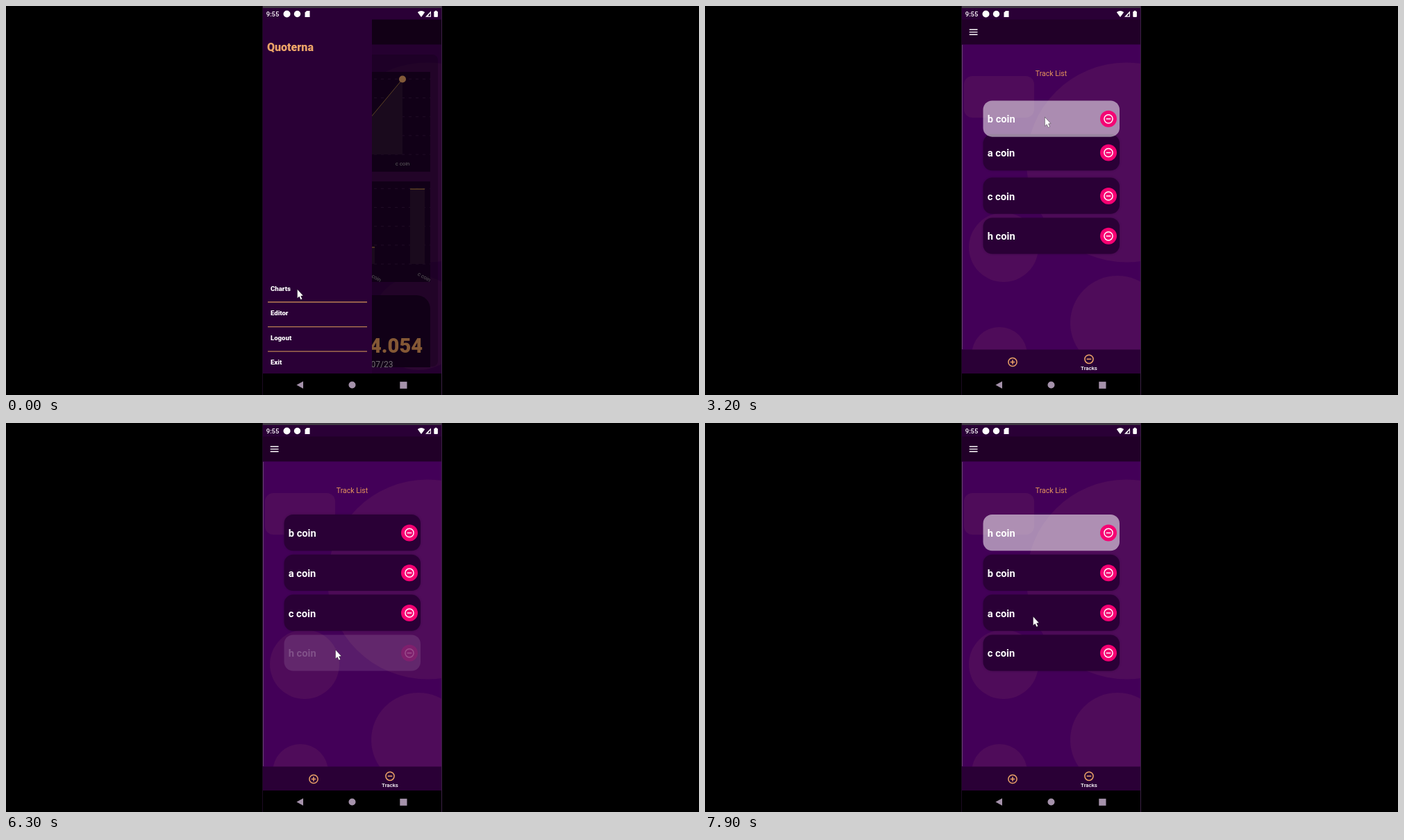
Write an HTML page with a canvas that moves like this. It is 998 px wide and 561 px high and loops after 8 s.

```html
<!DOCTYPE html>
<html lang="en">
<head>
<meta charset="utf-8">
<title>Track list</title>
<style>
  html, body { margin: 0; width: 100%; height: 100%; overflow: hidden; background: #000; }
  canvas { display: block; width: 998px; height: 561px; }
</style>
</head>
<body>
<canvas id="stage" width="998" height="561"></canvas>
<script>
const ctx = document.getElementById('stage').getContext('2d');
const LOOP = 8000, STEP = 100;
const LEFT = 370, WIDTH = 257.5, DRAWER = 157;
const FIRST_ROW = 132, PITCH = 57.8;
const DARK = '#2a0036', PURPLE = '#430058', BLOB = '#4f0c5a', ORANGE = '#eca468', PINK = '#f60073';

const NAMES = ['a coin', 'b coin', 'c coin', 'h coin'];
const DRAG_TIME = 650, SHIFT_TIME = 400, SHIFT_GAP = 150;

// Each drag lifts one card from its row to the top of the list.
const DRAGS = [
  { name: 'b coin', row: 1, press: 2000, lift: 2600, lead: 270, release: 4500 },
  { name: 'h coin', row: 3, press: 5700, lift: 6400, lead: 180, release: LOOP }
];

// Pointer moves: start, duration, destination.
const MOVES = [
  [0, 300, 414, 439], [400, 500, 512, 214], [900, 1000, 488, 223], [2600, 630, 489, 157],
  [3700, 600, 483, 262], [4700, 500, 479, 270], [5200, 400, 474, 327],
  [6400, 500, 473, 156], [7300, 600, 472, 279]
];

const progress = (t, start, duration) => Math.min(1, Math.max(0, (t - start) / duration));
const smooth = p => p * p * (3 - 2 * p);

function pointerAt(t) {
  let x = 419, y = 408.5;
  for (const [start, duration, toX, toY] of MOVES) {
    const p = progress(t, start, duration);
    x += (toX - x) * p;
    y += (toY - y) * p;
  }
  return [x, y];
}

function cardsAt(t) {
  const cards = NAMES.map((name, row) => ({ name, row, slot: row, alpha: 1, active: false }));
  for (const { name, row, press, lift, lead, release } of DRAGS) {
    for (const card of cards) {
      if (card.name === name) {
        card.row -= row * progress(t, lift, DRAG_TIME);
        card.slot = 0;
        card.alpha = 1 - .8 * progress(t, press, 250) + .8 * smooth(progress(t, lift + 200, 450));
        card.active = t >= lift - 100 && t < release;
      } else if (card.slot < row) {
        const delay = lead + SHIFT_GAP * (row - card.slot - 1);
        card.row += smooth(progress(t, lift + delay, SHIFT_TIME));
        card.slot++;
      }
    }
  }
  return cards.sort((a, b) => a.active - b.active);
}

function rect(x, y, w, h, color) {
  ctx.fillStyle = color;
  ctx.fillRect(x, y, w, h);
}

function round(x, y, w, h, r, color) {
  ctx.fillStyle = color;
  ctx.beginPath();
  ctx.roundRect(x, y, w, h, r);
  ctx.fill();
}

function disc(x, y, r, color) {
  ctx.fillStyle = color;
  ctx.beginPath();
  ctx.arc(x, y, r, 0, Math.PI * 2);
  ctx.fill();
}

function poly(points, color) {
  ctx.fillStyle = color;
  ctx.beginPath();
  points.forEach(([x, y]) => ctx.lineTo(x, y));
  ctx.closePath();
  ctx.fill();
}

function line(x1, y1, x2, y2, color, width = 1, dash = []) {
  ctx.strokeStyle = color;
  ctx.lineWidth = width;
  ctx.setLineDash(dash);
  ctx.beginPath();
  ctx.moveTo(x1, y1);
  ctx.lineTo(x2, y2);
  ctx.stroke();
  ctx.setLineDash([]);
}

function text(str, x, y, size, color, weight = 400, align = 'left') {
  ctx.font = `${weight} ${size}px Roboto, sans-serif`;
  ctx.textAlign = align;
  ctx.fillStyle = color;
  ctx.fillText(str, x, y);
}

function ringIcon(x, y, color, plus) {
  ctx.strokeStyle = color;
  ctx.lineWidth = 1.5;
  ctx.beginPath();
  ctx.arc(x, y, 6.1, 0, Math.PI * 2);
  ctx.stroke();
  line(x - 3.3, y, x + 3.3, y, color, 1.5);
  if (plus) line(x, y - 3.3, x, y + 3.3, color, 1.5);
}

function backdrop() {
  rect(LEFT, 19, WIDTH, 511, PURPLE);
  round(373, 101, 101, 60, 12, BLOB);
  disc(607, 225.5, 144, BLOB);
  disc(430, 348, 50, BLOB);
  disc(424, 503, 40, BLOB);
  disc(594, 457, 68, BLOB);
}

function header() {
  rect(LEFT, 19, WIDTH, 36.5, '#210028');
  for (let i = 0; i < 3; i++) line(380.7, 34 + i * 3.6, 392.5, 34 + i * 3.6, '#fff', 1.4);
}

function drawCard({ name, row, alpha, active }) {
  const y = FIRST_ROW + row * PITCH;
  ctx.save();
  ctx.globalAlpha = alpha;
  if (!active) {
    ctx.shadowColor = 'rgba(30,0,40,.35)';
    ctx.shadowBlur = 3;
  }
  round(400.5, y, 196.5, 52.2, 13, active ? 'rgba(255,255,255,.54)' : DARK);
  ctx.shadowColor = 'transparent';
  text(name, 406.7, y + 32, 14.7, '#fff', 700);
  disc(581, y + 26.4, 12, PINK);
  ringIcon(581, y + 26.4, '#fff');
  ctx.restore();
}

function trackPage(t) {
  backdrop();
  header();
  text('Track List', 498.5, 100.5, 10.5, '#e6965c', 400, 'center');
  cardsAt(t).forEach(drawCard);
  rect(LEFT, 495.5, WIDTH, 35, DARK);
  ringIcon(443, 513.5, ORANGE, true);
  ringIcon(553, 509.3, ORANGE);
  text('Tracks', 553, 525, 7.9, '#fff', 500, 'center');
  if (t >= 1000) rect(LEFT, 56, 1, 439, '#6b3f76');
}

function slantLabel(str, x, y) {
  ctx.save();
  ctx.translate(x, y);
  ctx.rotate(Math.PI / 6);
  text(str, 0, 0, 7.6, '#aaa', 400, 'center');
  ctx.restore();
}

function chartPanel(y, height) {
  rect(386, y, 225, height, '#1f0029');
  for (let i = 0; i < 5; i++) {
    const lineY = y + 10.3 + i * 27.2;
    line(420, lineY, 611, lineY, '#3a1545', 1, [4, 6]);
  }
}

function bar(x, y, bottom) {
  rect(x, y, 21, bottom - y, '#2f1235');
  line(x, y, x + 21, y, '#a5763f', 1.3);
}

function chartPage() {
  backdrop();
  header();
  round(376, 70, 246, 450, 8, 'rgba(30,0,40,.35)');

  chartPanel(95, 144);
  poly([[505, 214], [505, 185], [571, 105.5], [571, 214]], '#2f1235');
  line(505, 185, 571, 105.5, '#a5763f');
  disc(571, 105.5, 5, ORANGE);
  text('c coin', 571, 229.5, 7.8, '#aaa', 400, 'center');

  chartPanel(253, 145);
  bar(582, 264, 372);
  bar(510, 348, 372);
  slantLabel('b coin', 529.5, 393);
  slantLabel('c coin', 601, 393);

  round(386, 417, 225, 104, [20, 20, 0, 0], '#1f0029');
  text('84.054', 600, 500, 29, '#f0a060', 900, 'right');
  text('2021/07/23', 557.5, 521, 12, '#d0c8d2', 400, 'right');
}

function drawer(x) {
  rect(x, 19, DRAWER, 511, DARK);
  text('Quoterna', x + 6, 65, 16, ORANGE, 900);
  ['Charts', 'Editor', 'Logout', 'Exit'].forEach((label, i) => {
    const y = 410.5 + i * 35.6;
    text(label, x + 11, y, 9.6, '#fff', 900);
    if (i < 3) line(x + 7, y + 16.5, x + 150, y + 16.5, '#b98052', 1.3);
  });
}

function systemBars() {
  rect(LEFT, 0, WIDTH, 3, '#3f3943');
  rect(LEFT, 3, WIDTH, 16.5, DARK);
  text('9:55', 374.8, 15, 9.4, '#fff', 500);
  disc(404.5, 11.5, 5, '#fff');
  disc(419.5, 11.5, 4.7, '#fff');
  poly([[430.5, 9.5], [433, 7], [437.5, 7], [437.5, 16], [430.5, 16]], '#fff');
  ctx.beginPath();
  ctx.moveTo(598, 16);
  ctx.lineTo(592.8, 9);
  ctx.quadraticCurveTo(598, 5, 603.2, 9);
  ctx.fill();
  poly([[604, 15.7], [612, 7.2], [612, 15.7]], '#fff');
  poly([[607.5, 14.6], [611, 10.5], [611, 14.6]], DARK);
  round(616.3, 7.8, 5.6, 8.2, 1, '#fff');
  rect(617.8, 6.8, 2.6, 1.5, '#fff');

  const key = '#a592ab';
  rect(LEFT, 530, WIDTH, 31, '#000');
  poly([[418.5, 546.5], [428, 541.3], [428, 551.7]], key);
  disc(498.5, 546.5, 5, key);
  rect(567.3, 541.8, 10.2, 10, key);
  rect(LEFT - 1, 0, 1, 561, '#1c0a22');
  rect(627, 0, 1, 561, '#3b2144');
}

function cursor(x, y) {
  ctx.save();
  ctx.translate(x, y);
  poly([[.5, 0], [.5, 13], [3.3, 10.5], [5.4, 15], [7.6, 14], [5.6, 9.7], [9, 9.3]], '#fff');
  ctx.strokeStyle = 'rgba(0,0,0,.5)';
  ctx.lineWidth = .7;
  ctx.stroke();
  ctx.restore();
}

function draw(t) {
  rect(0, 0, 998, 561, '#000');
  const open = (1 - progress(t, 400, 600)) ** 2;
  ctx.save();
  ctx.beginPath();
  ctx.rect(LEFT, 19, WIDTH, 511);
  ctx.clip();
  if (t < 400) chartPage();
  else trackPage(t);
  if (open > 0) {
    rect(LEFT, 19, WIDTH, 511, `rgba(0,0,0,${.45 * open})`);
    drawer(LEFT - DRAWER * (1 - open));
  }
  ctx.restore();
  systemBars();
  cursor(...pointerAt(t));
}

function frame(now) {
  draw(Math.floor((now % LOOP) / STEP) * STEP);
  requestAnimationFrame(frame);
}
requestAnimationFrame(frame);
</script>
</body>
</html>
```
